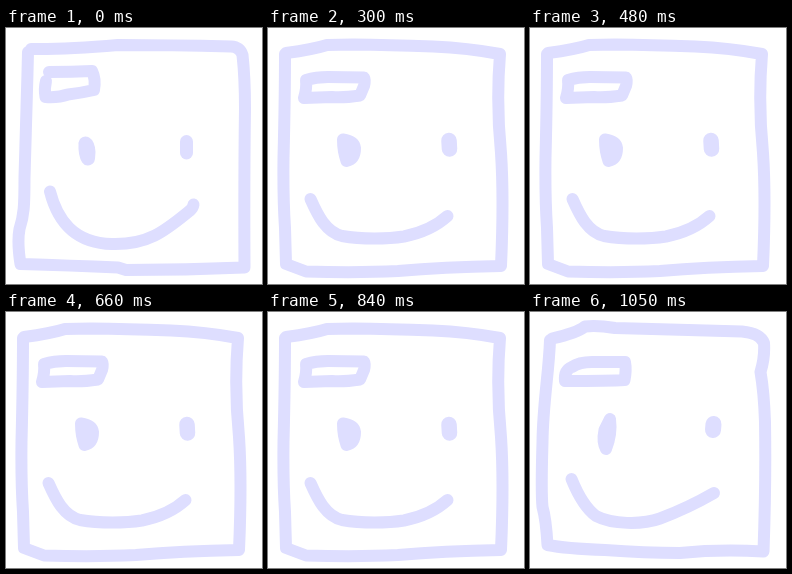
Write an HTML page that moves like this. It is 256 px wide and 256 px high and loops after 1.08 s.

```html
<!DOCTYPE html>
<html lang="en">
<head>
<meta charset="utf-8">
<title>Wobbly smile</title>
<style>
  html, body { margin: 0; width: 100%; height: 100%; overflow: hidden; background: #fff; }
  svg { display: block; width: 100vw; height: 100vh; }
  g { opacity: 0; }
  path { fill: none; stroke: #dedeff; stroke-linecap: round; stroke-linejoin: round; }
  .line { stroke-width: 12; }
  .eye { fill: #dedeff; }
</style>
</head>
<body>
<svg viewBox="0 0 256 256">
  <g>
    <path class="line" d="M22 24 C21 70 19 120 18.5 150 C18.5 178 18 187 13.5 201 Q11 214 14.5 236
      Q65 237.5 112 239.5 L120 242 Q180 242 238.5 239.5 Q238 150 239 80 Q239 50 236.5 27 Q234 19 225 18.5
      Q165 17 112 17 Q60 21.5 25 21"/>
    <path class="line" d="M43 44 Q66 44 86 43 Q90 51 88 62 Q75 65 62 66.5 Q52 70 39.5 69 Q38 61 40 53"/>
    <path class="eye" stroke-width="14" d="M79.5 115.5 Q82 117 82.5 124 L82 130.5 Q79 126 79.5 115.5"/>
    <path class="eye" stroke-width="13" d="M180.5 113.5 L180.5 125"/>
    <path class="line" stroke-width="11" d="M44 163.5 C51 191 67 215 106 216 C143 217 160 202 184 182.5 Q187 180 187.5 176.5"/>
  </g>
  <g>
    <path class="line" d="M17 26 Q17 70 15.5 130 Q15 170 17 200 L18 236 L38 243.5 Q90 245 130 243
      Q175 239 233 238 Q236 170 233 125 Q228 75 232 26 Q200 20 165 18.5 Q120 17 85 16.5
      L59 17 Q45 21.5 18 25"/>
    <path class="line" d="M38 52 Q48 49 60 49 L96 49.5 Q97.5 52 96 58 L92 67.5 Q75 70 64 69 L36 70 Q39 60 38 52"/>
    <path class="eye" stroke-width="12" d="M75 111.5 Q86 113 87 120 Q87 131 78.5 133 Q75 123 75 111.5"/>
    <path class="eye" stroke-width="15.5" d="M181 112.5 L181.5 121"/>
    <path class="line" d="M42.5 171 C50 188 58 204 74 208 C94 211.5 120 211 136 208.5 Q163 203 179.5 188"/>
  </g>
  <g>
    <path class="line" d="M20 28 C19 60 13 90 12.5 130 Q11 180 12.5 195 Q16 207 17.5 233 Q35 236.5 75 238
      Q115 241 150 241 Q190 237 233.5 239.5 Q236 170 235 110 Q234 80 230.5 60 Q235 45 234 31
      Q230 21 212 19.5 Q150 17.5 85 16 Q67 13 55 14.5 Q47 21 22 26.5"/>
    <path class="line" d="M42 55 Q49 50 62 50 L95 50 Q96.5 58 94.5 68 Q80 69 35 69 Q34 58 42 55"/>
    <path class="eye" stroke-width="12" d="M80 107 Q82 122 76 137 Q72 130 74.5 118 Z"/>
    <path class="eye" stroke-width="16" d="M183.5 112 L183 118"/>
    <path class="line" d="M41.5 167 C48 183 55 196 66 204 C82 212.5 112 213 130 206.5 Q158 196 184 181"/>
  </g>
</svg>
<script>
  const STEP = 30;
  const poses = [...document.querySelectorAll("g")];
  const count = poses.length;

  // Offsets sit just before each step so rounding never delays a change.
  poses.forEach((pose, i) => {
    const frames = [0, 0.33, 0.66, 1].map((offset, k) => ({
      offset,
      opacity: k % count === i ? 1 : 0,
      easing: "step-end"
    }));
    pose.animate(frames, { duration: STEP * count, iterations: Infinity });
  });
</script>
</body>
</html>
```
